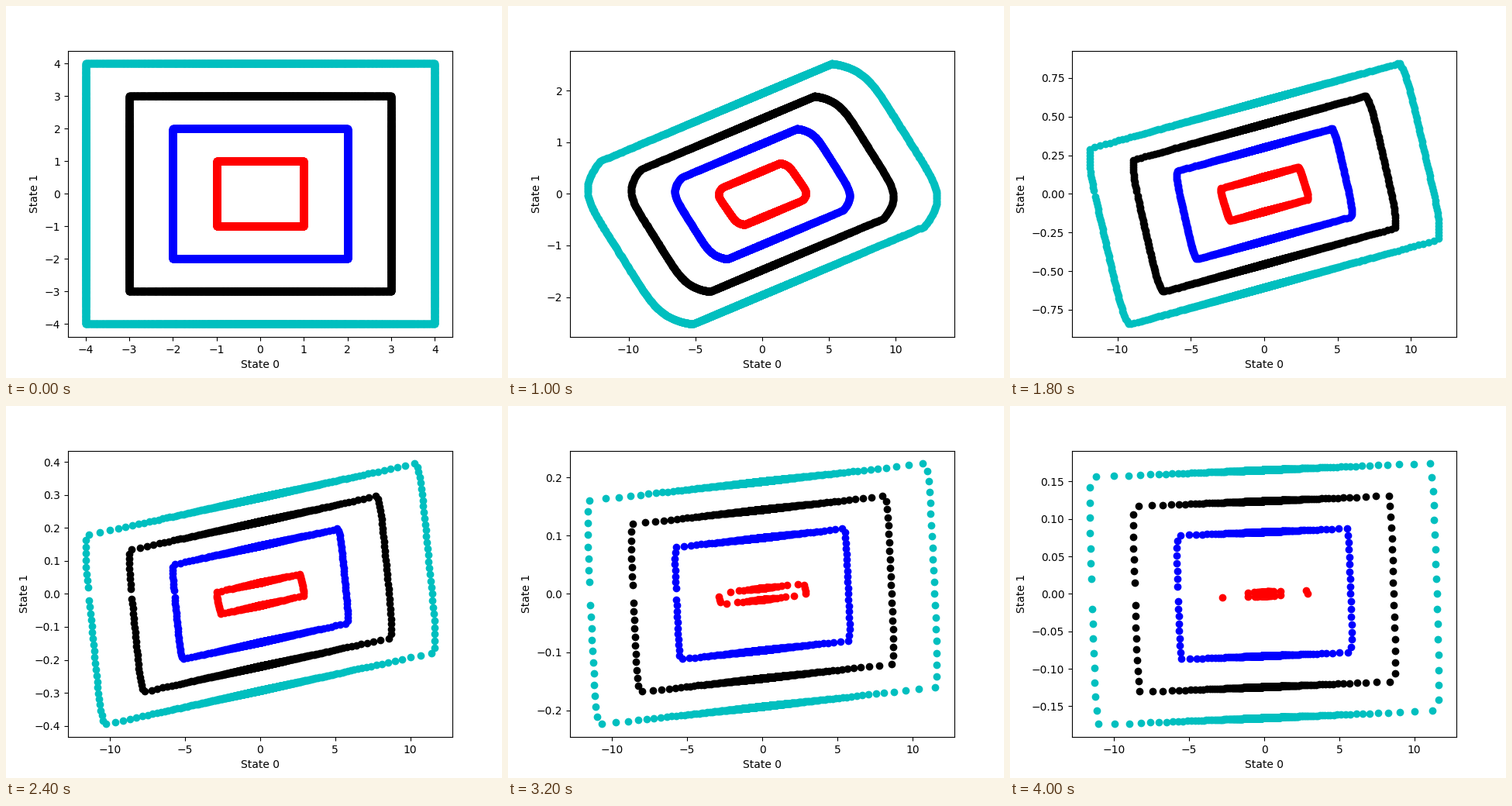
Animation of 640x480 px, one loop 4.2 s. Source, as a matplotlib script:

```python
import numpy as np
import matplotlib.pyplot as plt
from matplotlib.animation import FuncAnimation

STEPS, INTERVAL = 21, 200
LEVELS = ((4, "c"), (3, "k"), (2, "b"), (1, "r"))
DECAY = 0.735        # shrinking of State 1 per step
REACH = 2.83         # final half width along State 0
FLOOR = 0.0385       # half height that never decays, absent at level 1

# One ray every tenth of a degree, without the ray along the negative axis.
RAYS = np.radians(np.delete(np.arange(3600), 1800) / 10)


def cross(a, b):
    return a[..., 0] * b[..., 1] - a[..., 1] * b[..., 0]


def long_side(k):
    """Half of the side that turns from vertical to flat."""
    y = DECAY**k * (1.1 - 0.1 * np.exp(-k))
    return np.array([REACH * (1 - y), y])


def short_side(k, floor):
    """Half of the side that turns from flat to vertical."""
    x = 0.05 + 0.95 / (1 + (k / 7.4)**4.5)
    drop = 1.2 + 0.58 * np.exp(-((k - 7) / 1.8)**2 / 2)
    drop *= (1 - np.exp(-k**2 / 2.5)) * long_side(k)[1]
    return np.array([x, -drop - floor * min(k, 1)])


def polygon(k, level):
    """Parallelogram whose short sides bulge outwards, counterclockwise."""
    along = np.linspace(1, -1, 121)[:, None]
    swell = k**2 * np.exp(-0.95 * k) + 0.016 * (1 - np.exp(-k))
    bulge = swell * (1 - along**6) * (1 + 0.15 * along)
    floor = 0 if level == 1 else FLOOR
    half = along * short_side(k, floor) + (1 + bulge) * long_side(k)
    return level * np.vstack([half, -half, half[:1]])


def boundary(k, level):
    """Points where the rays from the origin leave the polygon."""
    corners = polygon(k, level)
    angles = np.unwrap(np.arctan2(corners[:, 1], corners[:, 0]))
    theta = angles[0] + (RAYS - angles[0]) % (2 * np.pi)
    i = np.searchsorted(angles, theta, side="right") - 1
    i = np.clip(i, 0, len(corners) - 2)
    start, edge = corners[i], corners[i + 1] - corners[i]
    ray = np.column_stack([np.cos(theta), np.sin(theta)])
    radius = cross(start, edge) / cross(ray, edge)
    return (ray * radius[:, None]).T


fig, ax = plt.subplots(figsize=(6.4, 4.8), dpi=100)


def draw(k):
    ax.clear()
    for level, color in LEVELS:
        ax.plot(*boundary(k, level), color + "o")
    ax.set_xlabel("State 0")
    ax.set_ylabel("State 1")
    return ax.lines


anim = FuncAnimation(fig, draw, frames=STEPS, init_func=lambda: [],
                     interval=INTERVAL, repeat=True, repeat_delay=0)
plt.show()
```
